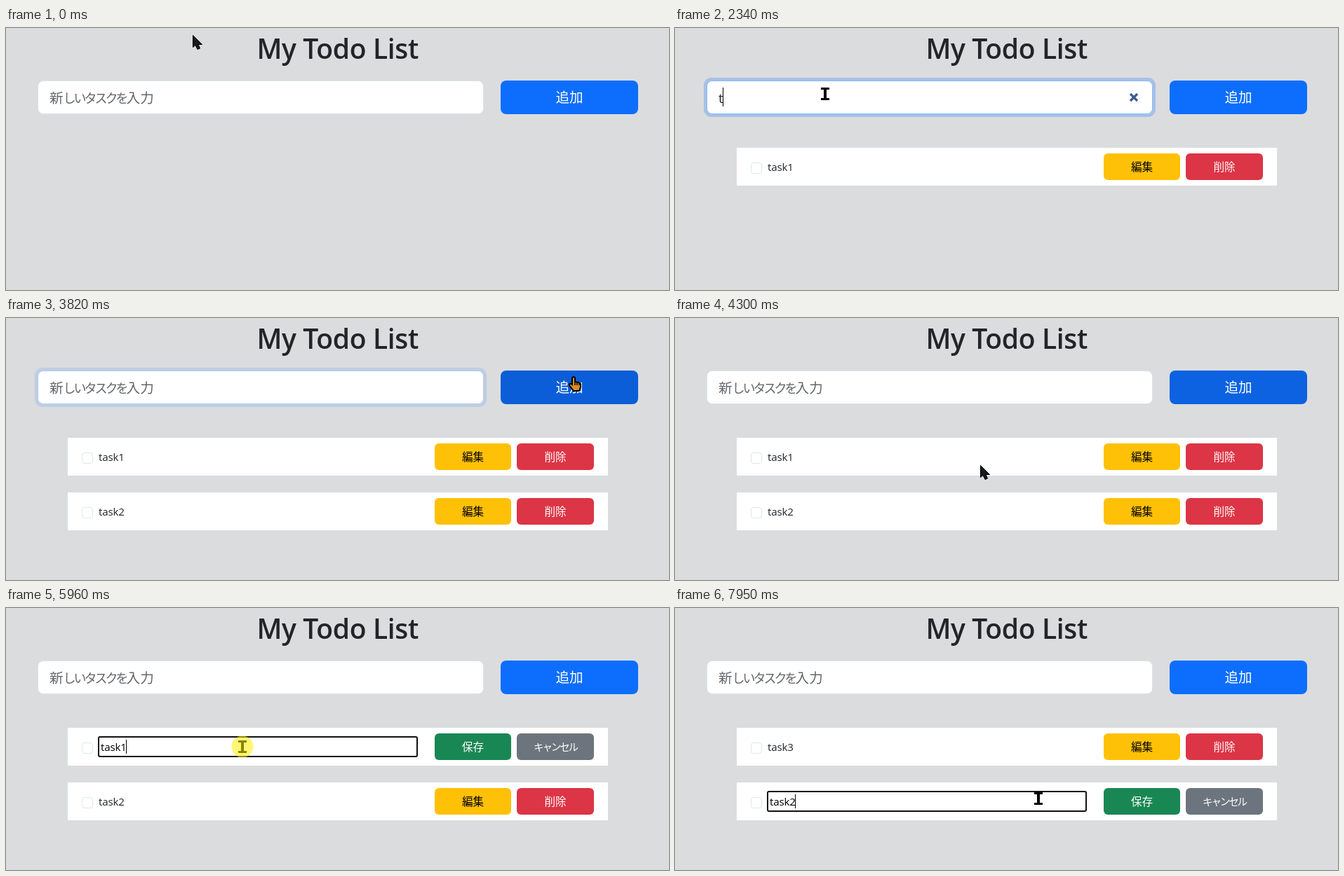
Recreate the animation shown at these times as an HTML page. Size 945 by 374 pixels, loop 8 s.

```html
<!DOCTYPE html>
<html lang="ja">
<head>
<meta charset="utf-8">
<title>My Todo List</title>
<style>
  html, body { margin: 0; width: 100%; height: 100%; overflow: hidden; background: #dbdcde; }
  svg { display: block; width: 945px; height: 374px; }
  text { font: 15.2px "Open Sans", "Noto Sans", sans-serif; letter-spacing: -.0115em; white-space: pre; }
  .title { font-size: 39px; font-weight: 600; letter-spacing: -.35px; }
  .big { font-size: 19px; }
  .ja { font: 15.6px "Noto Sans CJK JP", "Noto Sans CJK", sans-serif; letter-spacing: 0; }
  .ja.large { font-size: 19.6px; }
  .ja.hint { font-weight: 300; }
  .kana { font-size: 18px; letter-spacing: -3px; }
  .ja.tight { font-size: 14.6px; letter-spacing: -2.2px; }
</style>
</head>
<body>
<svg id="stage" viewBox="0 0 945 374"></svg>
<script>
const LOOP = 8000, PRESS = 120, INK = '#212529';

// Pointer moves; a press on arrival is optional
const moves = [
  { from: 70, to: 130, x: 214, y: 94, press: 400 },
  { from: 3340, to: 3530, x: 809, y: 84, press: 3610 },
  { from: 4210, to: 4290, x: 435, y: 210 },
  { from: 4500, to: 4860, x: 122, y: 196 },
  { from: 4990, to: 5270, x: 653, y: 196, press: 5330 },
  { from: 5480, to: 5690, x: 337, y: 198, press: 5845 },
  { from: 6370, to: 6640, x: 653, y: 196, press: 6770 },
  { from: 7000, to: 7200, x: 655, y: 270, press: 7340 },
  { from: 7520, to: 7750, x: 518, y: 272, press: 7830 }
];
const rows = [
  { y: 171, from: 1730, edit: [5460, 6840], focus: 5845,
    name: t => t < 6100 ? 'task1' : t < 6300 ? 'task' : 'task3' },
  { y: 249, from: 3750, edit: [7470, LOOP], focus: 7830, name: () => 'task2' }
];

const clamp = v => Math.max(0, Math.min(1, v));
const within = (t, a, b) => t >= a && t < b;
const fade = (t, a, b) => clamp((t - a) / 150) - clamp((t - b) / 150);
const typed = (t, word, first, last, clear) => t < first || t >= clear ? '' :
  word.slice(0, 1 + Math.floor((t - first) / (last - first) * (word.length - 1)));

const rect = (x, y, w, h, fill, r = 0, more = '') =>
  `<rect x="${x}" y="${y}" width="${w}" height="${h}" rx="${r}" fill="${fill}" ${more}/>`;
const text = (x, y, str, fill, cls = '', anchor = 'start') =>
  `<text x="${x}" y="${y}" fill="${fill}" class="${cls}" text-anchor="${anchor}">${str}</text>`;
const caret = (x, y, h) => rect(x, y, 1, h, '#000');

function pointerAt(t) {
  let x = 266, y = 10;
  for (const m of moves) {
    const k = clamp((t - m.from) / (m.to - m.from)), ease = k * k * (3 - 2 * k);
    x += (m.x - x) * ease;
    y += (m.y - y) * ease;
  }
  return { x, y, over: (l, top, w, h) => x >= l && x < l + w && y >= top && y < top + h };
}

function entry(t) {
  const value = typed(t, 'task1', 670, 1330, 1730) || typed(t, 'task2', 2340, 3090, 3750);
  const ring = fade(t, 380, 3750);
  let s = rect(41, 71, 644, 56, '#a7c0e6', 11, `opacity="${ring}"`) +
    rect(45.5, 75.5, 635, 47, '#fff', 7.5, 'stroke="#dee2e6"') +
    rect(45.5, 75.5, 635, 47, '#fff', 7.5, `stroke="#86b7fe" opacity="${ring}"`);
  s += value
    ? text(62, 107, value, INK, 'big') +
      '<path d="M649 94l10 10m0-10l-10 10" stroke="#3b5b92" stroke-width="3.2"/>'
    : text(62, 106.5, '新<tspan class="kana">しいタスクを</tspan>入力', '#63666a', 'ja large hint');
  const lit = within(t, 400, 3620) && !within(t, 1870, 2340);
  return s + (lit ? caret(value ? Math.round(58.5 + 9.8 * value.length) : 62, 85, 27) : '');
}

function button(x, y, w, h, label, color, ink = '#fff', cls = '') {
  const large = h > 40;
  return rect(x, y, w, h, color, large ? 8 : 6) +
    text(x + w / 2, y + h / 2 + (large ? 7.4 : 6), label, ink, 'ja ' + cls, 'middle');
}

function row(t, p, { y, from, edit, focus, name }) {
  if (t < from) return '';
  const label = name(t), hover = p.over(611, y + 8, 109, 38);
  const pair = (left, color, ink, right, other, cls) =>
    button(611, y + 8, 109, 38, left, color, ink) +
    button(728, y + 8, 110, 38, right, other, '#fff', cls);
  const s = rect(88, y, 770, 54, '#fff') +
    rect(108.5, y + 21.5, 15, 15, '#fff', 3.5, 'stroke="#dbe8ea"');
  if (!within(t, ...edit)) {
    return s + text(132, y + 33, label, INK) +
      pair('編集', hover ? '#ffca2c' : '#ffc107', '#000', '削除', '#dc3545');
  }
  const focused = t >= focus;
  return s +
    rect(132, y + 13, 454, 28, '#fff', 2,
      focused ? 'stroke="#101010" stroke-width="2"' : 'stroke="#767676"') +
    text(135, y + 33, label, '#000') +
    (focused ? caret(Math.round(132 + 7.8 * label.length), y + 17, 20) : '') +
    pair('保存', hover ? '#157347' : '#198754', '#fff', 'キャンセル', '#6c757d', 'tight');
}

function pointer(t, p) {
  const shown = rows.filter(r => t >= r.from);
  const onAdd = p.over(705, 75, 196, 48);
  const onButton = onAdd || shown.some(r => p.over(611, r.y + 8, 109, 38));
  const onField = p.over(45, 75, 636, 48) ||
    shown.some(r => within(t, ...r.edit) && p.over(131, r.y + 12, 456, 30));

  let shape = '<path d="M.5 .5V17.5L4 14.5L7 20.5L10.5 19L8 13.5H13.5Z" fill="#1a1a1a" stroke="#000"/>';
  if (onField) {
    shape = '<path d="M-6-9H6v3H2V6H6v3H-6V6H-2V-6H-6Z"/>';
  } else if (onButton) {
    shape = `<g transform="translate(-7 -1)" stroke="#000">
      <path d="M5 2.5q2-3 4 0v5.5l6 1.5q2 .5 2 3v3l-2 5.5H7L1.5 14q-1.5-3 1-3.5L5 12Z"
        fill="${onAdd ? '#d98a25' : '#000'}" stroke-width="2"/>
      <path d="M9 8v5M12 9v4M15 10v3" stroke-width="1.4"/></g>`;
  }
  const pressed = moves.some(m => m.press && within(t, m.press, m.press + PRESS));
  const halo = pressed ? '<circle r="15.5" fill="#fff000" opacity=".55"/>' : '';
  return `<g transform="translate(${p.x} ${p.y})">${shape}${halo}</g>`;
}

const stage = document.getElementById('stage');
function draw(now) {
  const t = now % LOOP, p = pointerAt(t), hover = fade(t, 3490, 4260);
  const blue = `color-mix(in srgb, #0b5ed7 ${hover * 100}%, #0d6efd)`;
  stage.innerHTML = text(357.4, 43.5, 'My Todo List', INK, 'title') + entry(t) +
    button(705, 75, 196, 48, '追加', blue, '#fff', 'large') +
    rows.map(r => row(t, p, r)).join('') +
    (within(t, 6840, 7830) ? caret(109, 195, 21) : '') +
    pointer(t, p);
  requestAnimationFrame(draw);
}
draw(performance.now());
</script>
</body>
</html>
```
